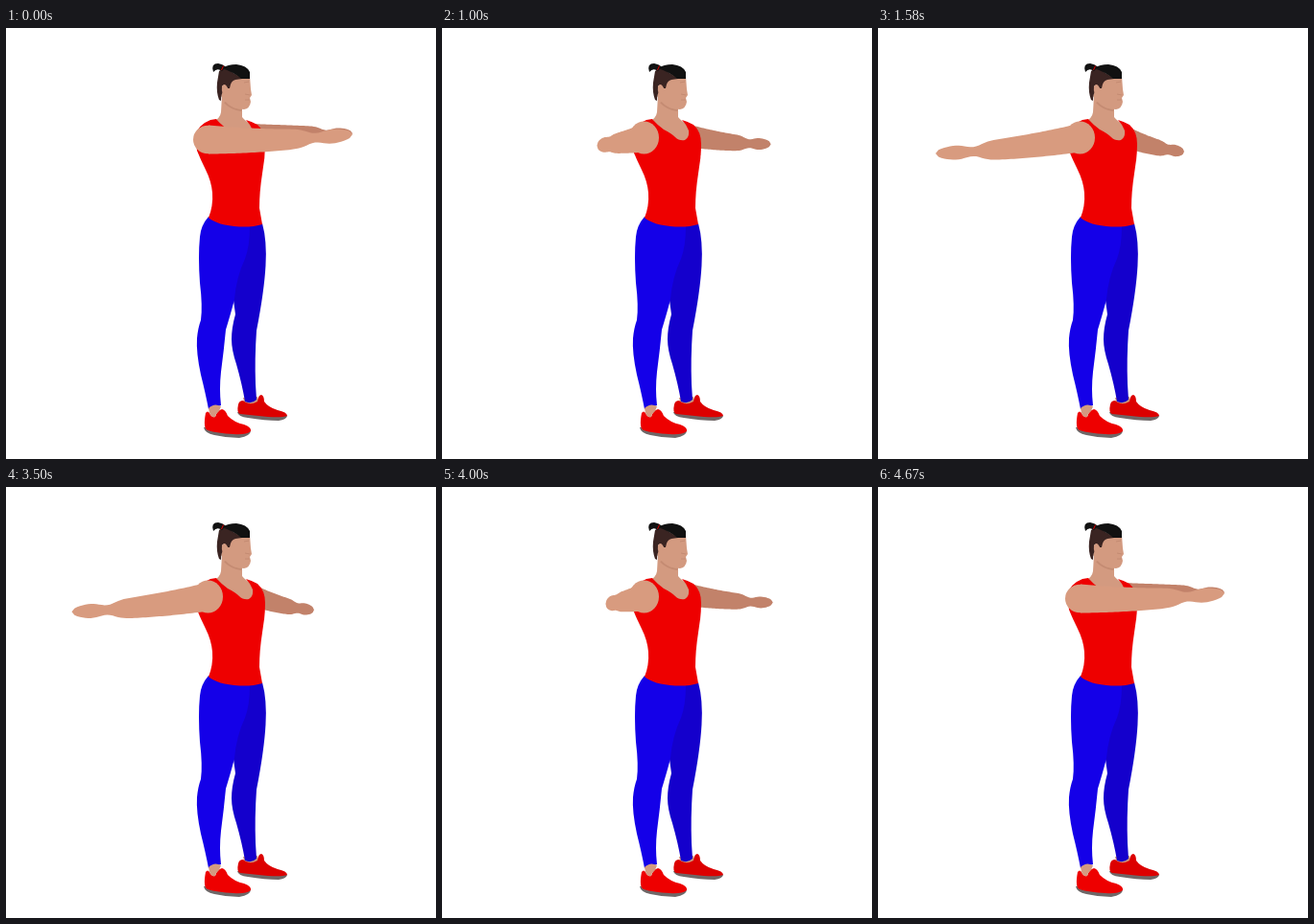
Recreate the animation shown at these times as an HTML page. Size 448 by 450 pixels, loop 4710 ms.

```html
<!DOCTYPE html>
<html lang="en">
<head>
<meta charset="utf-8">
<title>Arm opening exercise</title>
<style>
  html, body { margin: 0; width: 100%; height: 100%; overflow: hidden; background: #fff; }
  svg { display: block; width: 448px; height: 450px; }
</style>
</head>
<body>
<svg viewBox="0 0 448 450" xmlns="http://www.w3.org/2000/svg">
  <path id="far" fill="#c2826a"/>

  <!-- far leg and shoe -->
  <path fill="#cf9478" d="M247 386L262 385L264 393L249 394Z"/>
  <path fill="#6f6767" d="M241 401Q242 406 252 407Q270 410 284 410Q292 409 293 405L270 400Z"/>
  <path fill="#dc0000" d="M242 393Q243 389 247 389Q253 395 262 390Q263 383 266 383Q269 384 269 390Q273 396 283 399Q293 401 293 405Q288 407 273 406L244 403Q240 402 242 393Z"/>
  <path fill="#1400cc" d="M246 205L267 204Q272 222 270.5 248Q269 275 261 316Q259 345 260 372L261 388Q256 393 249 390Q246 372 240 351Q235 336 235 325Q235 313 239 299L237 284L234 240Z"/>

  <!-- near leg and shoe -->
  <path fill="#6f6767" d="M206 417Q207 423 217 425Q230 428 243 428Q255 426 255 420L230 414Z"/>
  <path fill="#ee0000" d="M208 402Q210 399 212 402Q214 407 218 406Q220 399 225 398Q229 399 231 405Q238 412 248 414Q256 417 255 421Q250 425 237 424Q220 423 210 420Q205 418 208 402Z"/>
  <path fill="#1400e8" d="M211 197Q227 207 254 207Q254 228 249 241Q240 260 238 283Q236 292 229 315Q227 336 224 359Q222 377 224 394L211 398Q208 382 203 362Q198 339 199 324Q200 313 203 305Q205 291 202 266Q200 238 202 218Q203 206 211 197Z"/>
  <path fill="#d39a80" d="M211 397Q217 391 224 395L222 400Q219 402 218 406Q214 407 212 402Z"/>

  <!-- neck, chest and head -->
  <path fill="#d39a80" d="M225 70L246 80L246 93Q249 97 256 101L260 118L238 118L215 98Q223 95 224 88Z"/>
  <path fill="#c48b72" d="M229 77Q235 84 246 85L245 87Q233 85 227 78Z"/>
  <path fill="#d39a80" d="M228 55L236 48L254 50L255 64L256 70L254 73L255 77Q254 84 248 85Q234 84 229 77L224 71Z"/>
  <path fill="none" stroke="#c48b72" d="M248 57L253 56M249 69L254 70M249 75L254 75"/>
  <path fill="#3a2422" d="M222 45L228 41L246 53L239 54Q234 55 233 63L231 63Q228 57 225 61L226 67Q224 69 224 76L222 75Q219 67 220 57Z"/>
  <path fill="#d39a80" d="M225 61Q228 56 231 63L229 70Q224 70 225 61Z"/>
  <path fill="#111" d="M225 42Q231 38 240 38Q251 39 254 46L254 53L245 53Q237 46 225 42Z"/>
  <path fill="#111" d="M216 46Q213 37 221 37Q227 38 229 41L225 45Q220 41 216 46Z"/>
  <path fill="none" stroke="#d90000" d="M226.500 39.500L224.500 44"/>

  <!-- tank top -->
  <path fill="#ee0000" d="M213 96L219 95Q223 100 231 106Q239 110 243 114Q247 118 253 117Q258 114 257 107Q255 101 250 96Q257 98 262 101Q270 108 270 121Q270 136 267 152Q264 171 264 188L267 205Q258 208 243 207.500Q220 206 211 198Q216 186 215 172Q214 160 208 148Q203 138 199 128L197 113Q200 101 213 96Z"/>

  <ellipse id="shoulder" cx="210.500" rx="15.500" fill="#d89b7f"/>
  <path id="near" fill="#d89b7f"/>
</svg>
<script>
const LOOP = 4710, STEP = 1000 / 24;
const OPEN_AT = 210, OPEN_STEPS = 34, CLOSE_AT = 3500, CLOSE_STEPS = 29;

// hand positions along x against openness; the near one is quickest while it points at the viewer
const NEAR_X = [[0, 361], [0.33, 294], [0.44, 198], [1, 60]];
const FAR_X = [[0, 361], [0.4, 353.5], [1, 319]];

const lerp = (a, b, t) => a + (b - a) * t;
const $ = id => document.getElementById(id);

function track(keys, p) {
  const i = Math.max(1, keys.findIndex(k => p <= k[0]));
  const [a, b] = [keys[i - 1], keys[i]];
  return lerp(a[1], b[1], (p - a[0]) / (b[0] - a[0]));
}

// half width: a taper, pinched at the wrist when stretched and rounded at the fingertips
function halfWidth(u, stretch) {
  const pinch = 4.5 * stretch * Math.exp(-(((u - 0.74) / 0.08) ** 2));
  return (15 - 7.5 * u - pinch) * Math.sqrt(1 - u ** 12);
}

function limb(base, tip, length, scale, sag) {
  const stretch = Math.abs(tip.x - base.x) / length;
  const upper = [], lower = [];
  for (let i = 0; i <= 50; i++) {
    const u = i / 50, r = scale * halfWidth(u, stretch);
    const x = lerp(base.x, tip.x, u);
    const y = lerp(base.y, tip.y, u) + 4 * sag * stretch * u * (1 - u);
    upper.push([x.toFixed(2), (y - r).toFixed(2)]);
    lower.unshift([x.toFixed(2), (y + r).toFixed(2)]);
  }
  return 'M' + upper.concat(lower).join('L') + 'Z';
}

const stepsSince = (t, start) => Math.floor((t - start) / STEP + 0.15) + 1;

function openness(t) {
  if (t < OPEN_AT) return 0;
  if (t < CLOSE_AT) return Math.min(1, stepsSince(t, OPEN_AT) / OPEN_STEPS);
  return Math.max(0, 1 - stepsSince(t, CLOSE_AT) / CLOSE_STEPS);
}

function draw(t) {
  const p = openness(t);
  const hand = { x: track(NEAR_X, p), y: lerp(111, 131, p) };
  const farHand = { x: track(FAR_X, p), y: lerp(110, 129, p) };
  const forward = hand.x > 211;
  const shoulder = { x: 211, y: forward ? 116.5 : 114.5 };

  $('shoulder').setAttribute('cy', shoulder.y);
  $('shoulder').setAttribute('ry', forward ? 14.7 : 17);
  $('near').setAttribute('d', limb(shoulder, hand, 150, 1, 3));
  $('far').setAttribute('d', limb({ x: 255, y: 112 }, farHand, 105, 0.8, 5 * p));
}

function tick() {
  draw(performance.now() % LOOP);
  requestAnimationFrame(tick);
}
tick();
</script>
</body>
</html>
```
